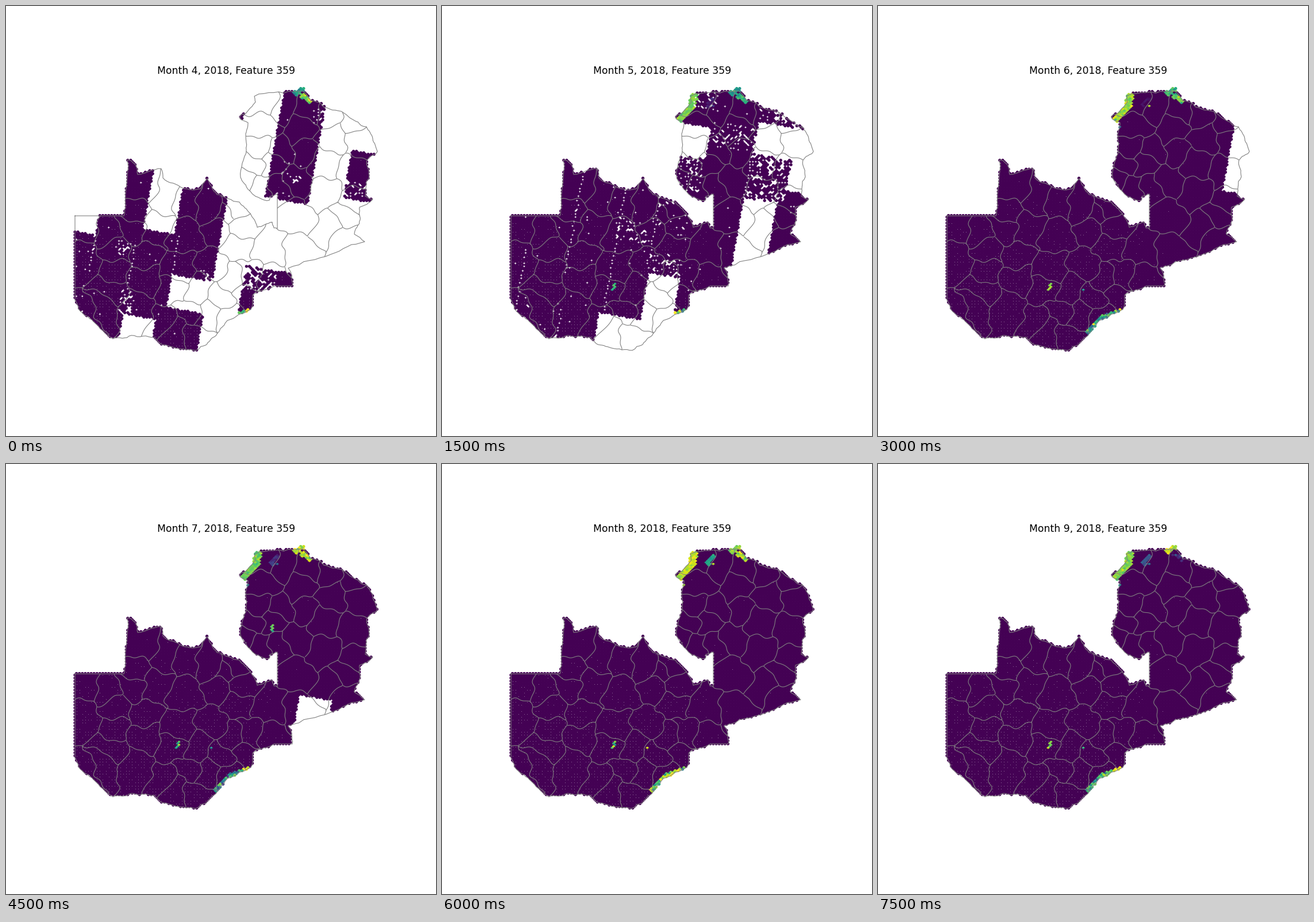
A matplotlib script for the animation above (9000 ms loop, 748x748 px).

```python
import numpy as np
import matplotlib.pyplot as plt
from matplotlib.animation import FuncAnimation
from matplotlib.path import Path

SIZE, DPI = 748, 100
STEP_X, STEP_Y = 2.55, 2.6
EVERYWHERE = (0, 900, 0, 900)

# Key points of the outer boundary, clockwise; roughen() adds the detail
COAST_NORTH = [
    (120, 365), (205, 365), (208, 350), (211, 268), (215, 268), (226, 277), (229, 293),
    (270, 283), (273, 299), (308, 317), (338, 318), (350, 300), (354, 309), (367, 328),
    (406, 341), (425, 361), (437, 385), (463, 376), (466, 386), (472, 387), (472, 327),
    (459, 331), (458, 338), (441, 334), (419, 316), (408, 298), (418, 250), (417, 225),
    (421, 203), (407, 196), (408, 190), (417, 187), (434, 167), (432, 157), (500, 149),
    (517, 148), (530, 165), (548, 170), (553, 176)]
COAST_SOUTH = [
    (592, 189), (618, 208), (627, 210), (638, 231), (646, 253), (628, 268), (632, 297),
    (627, 305), (625, 331), (638, 336), (615, 350), (616, 372), (606, 397), (624, 410),
    (565, 432), (491, 456), (497, 470), (498, 487), (467, 487), (429, 503), (429, 520),
    (426, 528), (385, 547), (370, 567), (349, 589), (331, 599), (295, 595), (268, 587),
    (258, 576), (218, 573), (186, 579), (152, 549), (127, 528), (120, 512), (120, 365)]

# One point inside each district
CENTRES = np.array([
    (140, 381), (178, 392), (137, 445), (193, 424), (217, 386), (187, 462), (238, 440),
    (235, 320), (225, 358), (280, 335), (262, 385), (310, 400), (310, 340), (240, 470),
    (140, 530), (180, 492), (165, 520), (230, 530), (300, 455), (293, 495), (336, 495),
    (275, 550), (330, 570), (295, 565), (320, 533), (350, 540), (375, 505), (388, 540),
    (360, 450), (395, 478), (425, 470), (460, 425), (400, 415), (375, 388), (355, 350),
    (405, 385), (398, 350), (383, 364), (460, 475), (418, 505), (510, 365), (508, 430),
    (565, 385), (590, 360), (590, 405), (605, 345), (555, 330), (610, 290), (550, 270),
    (450, 165), (447, 213), (485, 175), (525, 175), (512, 217), (565, 190), (570, 230),
    (612, 235), (600, 200), (482, 250), (440, 245), (465, 278), (428, 275), (420, 305),
    (445, 312), (472, 312), (500, 300), (520, 255)])

# Water as thick strokes: path, half width, spread, value per month
WATER = [
    ([(438, 158), (436, 174), (416, 195)], 6.5, 0.05, [0, 0.8, 0.85, 0.78, 0.91, 0.82]),
    ([(504, 153), (515, 146)], 4.5, 0.07, [0.55, 0.55, 0.7, 0.9, 0.8, 0.94]),
    ([(515, 156), (529, 167)], 4.5, 0.08, [0.8, 0.62, 0.76, 0.9, 0.91, 0.07]),
    ([(472, 161), (463, 173)], 4.5, 0.04, [0, 0.06, 0.04, 0.15, 0.58, 0.27]),
    ([(424, 529), (406, 535)], 3, 0.2, [0.8, 0.8, 0.8, 0.85, 0.85, 0.8]),
    ([(400, 537), (383, 546), (364, 569)], 3.5, 0.22, [0, 0, 0.65, 0.55, 0.72, 0.6]),
    ([(300, 484), (300, 489), (295, 495)], 1.7, 0.08, [0, 0.7, 0.85, 0.72, 0.7, 0.8]),
    ([(357, 492), (355, 495)], 1.7, 0.08, [0, 0, 0.55, 0.55, 0.9, 0.7]),
    ([(421, 211), (422, 211)], 1.5, 0.04, [0, 0, 0.4, 0.4, 0.9, 0.4]),
    ([(471, 176), (472, 176)], 1.5, 0.04, [0, 0.15, 0.85, 0.4, 0.9, 0.4]),
    ([(463, 282), (463, 289)], 3, 0.05, [0, 0, 0, 0.7, 0, 0])]

# Tiles are (u0, u1, v0, v1) in the slanted frame of the satellite passes
MONTHS = [
    dict(
        cover=[(0, 235, 433, 900), (163, 243, 200, 562), (243, 308, 409, 562),
               (300, 380, 250, 479), (294, 375, 538, 900), (446, 522, 0, 317),
               (582, 900, 210, 295), (435, 900, 442, 900), (370, 383, 170, 195)],
        thin=[((435, 490, 442, 482), 0.48), ((505, 522, 140, 175), 0.25),
              ((465, 505, 245, 310), 0.08), ((582, 620, 262, 295), 0.2),
              ((200, 228, 435, 460), 0.28), ((226, 250, 520, 562), 0.3),
              ((352, 380, 462, 479), 0.25), ((0, 165, 433, 570), 0.03)],
        seams=[(163, 435, 500), (235, 440, 520), (308, 410, 480)], rare=0.004),
    dict(
        holes=[(300, 442, 193, 250), (522, 592, 169, 226), (592, 900, 169, 281),
               (520, 580, 305, 900), (378, 435, 464, 900), (304, 378, 548, 900)],
        thin=[((403, 450, 125, 165), 0.25), ((445, 521, 180, 225), 0.3),
              ((380, 442, 250, 310), 0.35), ((521, 592, 226, 305), 0.4),
              ((521, 600, 135, 169), 0.28), ((308, 365, 375, 415), 0.2),
              ((372, 435, 425, 464), 0.28), ((365, 430, 330, 390), 0.08)],
        seams=[(233, 300, 490), (312, 325, 550), (375, 340, 440), (158, 460, 560),
               (238, 555, 620), (521, 226, 305)], rare=0.008),
    dict(holes=[(592, 900, 0, 281)]),
    dict(holes=[(518, 577, 376, 900)]),
    dict(),
    dict()]


def roughen(line, rng, amount=0.07):
    """Bend each slanted segment a little at its middle, three times."""
    for _ in range(3):
        out = [line[0]]
        for (x0, y0), (x1, y1) in zip(line, line[1:]):
            dx, dy = x1 - x0, y1 - y0
            if dx and dy and np.hypot(dx, dy) > 5:
                k = np.clip(rng.normal(0, amount), -0.1, 0.1) * min(1, 24 / np.hypot(dx, dy))
                out.append(((x0 + x1) / 2 - dy * k, (y0 + y1) / 2 + dx * k))
            out.append((x1, y1))
        line = out
    return line


def slanted(pts):
    x, y = pts.T
    return x + 0.18 * (y - 360), y - 0.17 * (x - 360)


def in_tile(tile):
    u0, u1, v0, v1 = tile
    return (U >= u0) & (U < u1) & (V >= v0) & (V < v1)


def in_any(tiles):
    return np.any([in_tile(t) for t in tiles], axis=0)


def near_stroke(path, width, pts):
    """Points closer to a polyline than the given half width."""
    hit = np.zeros(len(pts), bool)
    for a, b in zip(np.array(path, float), np.array(path[1:], float)):
        t = np.clip((pts - a) @ (b - a) / np.sum((b - a) ** 2), 0, 1)
        hit |= np.hypot(*(pts - a - t[:, None] * (b - a)).T) < width
    return hit


def draw_districts(ax, clip):
    """Cells around the centres, with borders bent by a few waves."""
    gx, gy = np.meshgrid(np.arange(116, 652, 2), np.arange(140, 606, 2))
    wx = gx + 4 * np.sin(gy / 9 + gx / 40) + 2 * np.sin(gy / 4.3 + gx / 11)
    wy = gy + 4 * np.sin(gx / 10 - gy / 35) + 2 * np.sin(gx / 4.7 + gy / 13)
    dist = np.array([np.hypot(wx - cx, wy - cy) for cx, cy in CENTRES])
    for k in range(len(dist) - 1):
        gap = dist[k] - dist[k + 1:].min(axis=0)
        if k:
            gap = np.ma.masked_where(dist[:k].min(axis=0) < dist[k] - 2, gap)
        if gap.min() < 0 < gap.max():
            lines = ax.contour(gx, gy, gap, levels=[0], colors="gray", linewidths=0.8, zorder=3)
            lines.set_clip_path(clip, ax.transData)


rng = np.random.default_rng(7)
outline = np.array(roughen(COAST_NORTH + COAST_SOUTH, rng))
country = Path(outline)

# Staggered lattice of samples, with pinholes between them
col, row = np.meshgrid(np.arange(212), np.arange(184))
lattice = np.column_stack([(120 + col * STEP_X).ravel(), (143.5 + row * STEP_Y).ravel()])
even = ((col + row) % 2 == 0).ravel()
land = country.contains_points(lattice) | country.contains_points(lattice + [0, 1.5])
shore = np.any([near_stroke(p, w, lattice) for p, w, *_ in WATER[:3]], axis=0)
sites = lattice[even & (land | shore)]
U, V = slanted(sites)
water_masks = [near_stroke(p, w, sites) for p, w, *_ in WATER]

gaps = lattice[~even & land & (row % 2 == 0).ravel()]
south = np.clip((gaps[:, 1] - 310) / 230, 0, 1) * np.clip((505 - gaps[:, 0]) / 130, 0, 1)
pinholes = gaps[rng.random(len(gaps)) < 0.01 + 0.6 * south]


def sample(month):
    """Visible sites and their values for one month."""
    m = MONTHS[month]
    rng = np.random.default_rng(40 + month)
    keep = in_any(m.get("cover", [EVERYWHERE]))
    if "holes" in m:
        keep &= ~in_any(m["holes"])
    drop = np.full(len(sites), m.get("rare", 0.0))
    for tile, p in m.get("thin", []):
        drop[in_tile(tile)] = p
    keep &= rng.random(len(sites)) >= drop
    for u, v0, v1 in m.get("seams", []):
        for v in np.arange(v0, v1, 7.5):
            keep[np.argmin((U - u) ** 2 + (V - v) ** 2)] = False

    value = np.zeros(len(sites))
    for mask, (_, _, spread, levels) in zip(water_masks, WATER):
        if levels[month]:
            value[mask] = np.clip(rng.normal(levels[month], spread, mask.sum()), 0, 1)
    return sites[keep], value[keep]


fig = plt.figure(figsize=(SIZE / DPI, SIZE / DPI), dpi=DPI, facecolor="white")
ax = fig.add_axes([0, 0, 1, 1])
draw_districts(ax, country)
ax.plot(*outline.T, color="gray", linewidth=0.8, zorder=3)

dots = ax.scatter([], [], c=[], s=(5.3 * 72 / DPI) ** 2, cmap="viridis", vmin=0, vmax=1,
                  linewidths=0, zorder=1)
dots.set_snap(False)
ax.scatter(*pinholes.T, s=(72 / DPI) ** 2, marker="s", color="white", alpha=0.4,
           linewidths=0, zorder=2)
title = ax.text(383.35, 117.5, "", fontsize=12.45, family="DejaVu Sans", ha="center",
                va="baseline", color="black")
ax.set(xlim=(0, SIZE), ylim=(SIZE, 0))
ax.axis("off")


def update(i):
    pts, value = sample(i)
    dots.set_offsets(pts)
    dots.set_array(value)
    title.set_text(f"Month {i + 4}, 2018, Feature 359")
    return dots, title


anim = FuncAnimation(fig, update, frames=len(MONTHS), interval=1500, repeat=True,
                     repeat_delay=0, blit=False)
plt.show()
```
